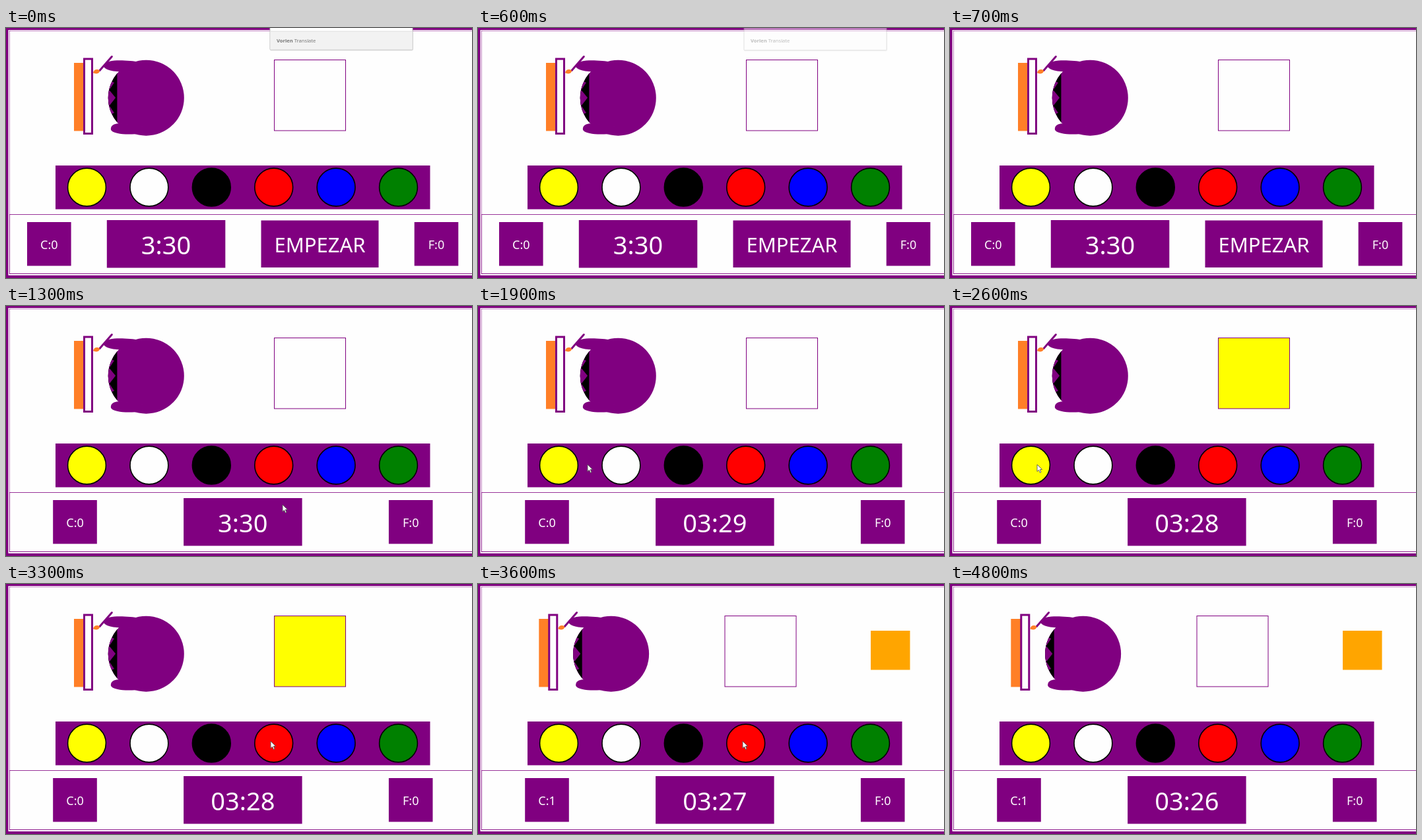
These frames come from a looping animation (706x380 px, 5.7 s). An HTML page:

```html
<!DOCTYPE html>
<html lang="es">
<head>
<meta charset="utf-8">
<title>Mezcla de colores</title>
<style>
html, body { margin: 0; width: 100%; height: 100%; overflow: hidden; background: #fefefe; }
svg { display: block; width: 706px; height: 380px; }
text { font-family: "Noto Sans", sans-serif; fill: #fff; text-anchor: middle; }
.big { font-size: 38px; }
.word { font-size: 31px; }
.small { font-size: 18px; }
.tip { font-size: 7.6px; fill: #777; text-anchor: start; }
.p { fill: #800080; }
</style>
</head>
<body>
<svg viewBox="0 0 706 380">
  <defs>
    <clipPath id="face"><rect x="150" y="45" width="18.4" height="122"/></clipPath>
    <clipPath id="head"><circle cx="212.3" cy="106.2" r="57.5"/></clipPath>
  </defs>
  <rect width="706" height="380" fill="#fefefe"/>
  <g class="p">
    <rect width="706" height="3"/>
    <rect width="3.5" height="380"/>
    <rect y="376" width="706" height="4"/>
    <rect x="5" y="4" width="701" height="1" opacity=".45"/>
    <rect x="5" y="4" width="1" height="279" opacity=".45"/>
    <rect x="5" y="283" width="701" height="1" opacity=".8"/>
    <rect x="5" y="283" width="1" height="91" opacity=".8"/>
    <rect x="5" y="373" width="701" height="1" opacity=".9"/>
  </g>

  <g id="painter">
    <rect x="103" y="53" width="15" height="103.5" fill="#ff7f27"/>
    <rect x="118.5" y="47" width="12" height="113.5" fill="#fefefe" stroke="#800080" stroke-width="3"/>
    <path d="M160.3 43.5 142 64.5" stroke="#800080" stroke-width="3" stroke-linecap="round"/>
    <path d="M132 68C133 63 138 61.5 142 64.5C142 69 137 71 132 68Z" fill="#ff7f27"/>
    <circle class="p" cx="212.3" cy="106.2" r="57.5"/>
    <circle cx="212.3" cy="106.2" r="57.5" clip-path="url(#face)"/>
    <g class="p" clip-path="url(#head)">
      <path d="M152 93 157.5 95.5 166 106 157.5 117 152 119Z"/>
      <path id="notch" d="M152 78 164 83 156.5 94 152 94Z"/>
      <path d="M152 134 164 129 156.5 118 152 118Z"/>
    </g>
    <path class="p" d="M148 56C151 50 166 48.5 180 49.5C192 50 200 51 206 53L202 65C186 67.5 168 67 158 64.5C151 62.5 147 60 148 56Z"/>
    <path class="p" d="M159 152C160 146 168 144 178 146L208 150L206 160C193 162 178 162 169 160C161 158 158 156 159 152Z"/>
  </g>

  <rect id="box" y="48.5" width="108" height="107.5" stroke="#800080"/>
  <rect id="mix" x="595" y="71" width="59.5" height="59.5" fill="#ffa500"/>

  <rect class="p" x="75" y="209" width="567.5" height="66.5"/>
  <g id="paints" stroke="#000" stroke-width="1.6"></g>

  <g id="hits"><rect class="p" x="-33.3" y="295" width="66.6" height="66.5"/><text class="small" y="335.5"></text></g>
  <g id="clock"><rect class="p" x="-89.7" y="292" width="179.5" height="72.5"/><text class="big" y="343.5"></text></g>
  <g id="start"><rect class="p" x="386.5" y="292.5" width="178" height="71.5"/><text class="word" x="475.5" y="341">EMPEZAR</text></g>
  <g id="fails"><rect class="p" x="-33.3" y="295" width="66.6" height="66.5"/><text class="small" y="335.5">F:0</text></g>

  <g id="popup">
    <rect x="399.5" y="-4" width="217.5" height="38.5" rx="2" fill="#000" opacity=".12"/>
    <rect x="400" y="-4" width="216" height="37" rx="1.5" fill="#fff" stroke="#c4c4c4"/>
    <rect id="strip" x="400.5" y="5" width="215" height="27.5" fill="#f2f2f2"/>
    <path id="rule" d="M400.5 5H615.5" stroke="#dedede"/>
    <text class="tip" x="410" y="21.5"><tspan font-weight="600">Vorlen</tspan> Translate</text>
  </g>

  <path id="arrow" d="M0 0V10.5L2.5 8.3 4.3 12.4 6 11.6 4.3 7.6H7.6Z" fill="#fff" stroke="#555" stroke-width=".9" stroke-linejoin="round"/>
</svg>
<script>
const LOOP = 5700, STEP = 100;
const $ = id => document.getElementById(id);
const clamp = v => Math.min(1, Math.max(0, v));
const show = (id, on) => $(id).setAttribute("display", on ? "inline" : "none");
const move = (id, x, y = 0) => $(id).setAttribute("transform", `translate(${x} ${y})`);
const write = (id, s) => { $(id).querySelector("text").textContent = s; };

["#ffff00", "#fefefe", "#000", "#f00", "#00f", "#008000"].forEach((fill, i) => {
  const c = document.createElementNS("http://www.w3.org/2000/svg", "circle");
  const attrs = { cx: 122.5 + 94.4 * i, cy: 242, r: 28.9, fill };
  for (const k in attrs) c.setAttribute(k, attrs[k]);
  $("paints").append(c);
});

// pointer path: time, x, y
const path = [
  [800, 447, 322], [1000, 444, 320], [1300, 419, 302], [1500, 310, 255],
  [1600, 262, 240], [1900, 166, 241], [2100, 143, 242], [2300, 132, 241],
  [2600, 132, 241], [2800, 232, 245], [3000, 355, 242], [3100, 387, 239],
  [3300, 401, 239], [4400, 401, 239], [4500, 412, 190], [4600, 440, 100], [4700, 470, 8]
];

function pointer(t) {
  let i = 0;
  while (i < path.length - 2 && t >= path[i + 1][0]) i++;
  const [a, b] = [path[i], path[i + 1]];
  const k = clamp((t - a[0]) / (b[0] - a[0]));
  return [a[1] + (b[1] - a[1]) * k, a[2] + (b[2] - a[2]) * k];
}

function draw(ms) {
  const t = Math.floor(ms % LOOP / STEP) * STEP;
  const playing = t >= 800, mixed = t >= 3500;

  move("painter", mixed ? -10.7 : 0);
  $("box").setAttribute("x", mixed ? 374 : 406.5);
  $("box").setAttribute("fill", t >= 2600 && !mixed ? "#ffff00" : "#fefefe");
  show("mix", mixed);

  move("hits", playing ? 104.5 : 65.3);
  move("clock", playing ? 358.8 : 242.5);
  move("fails", playing ? 613.2 : 652);
  show("start", !playing);
  write("hits", mixed ? "C:1" : "C:0");
  const left = 30 - Math.floor((t - 600) / 1000);
  write("clock", t < 1600 ? "3:30" : "03:" + Math.max(26, left));

  const fade = clamp((t - 300) / 400);
  show("popup", t < 700);
  move("popup", 4 * fade, fade);
  $("popup").setAttribute("opacity", 1 - 0.7 * fade);
  $("strip").setAttribute("opacity", 1 - fade);
  $("rule").setAttribute("opacity", 1 - fade);

  show("arrow", playing && t < 4800);
  move("arrow", ...pointer(t));
}

const begin = performance.now();
function tick() {
  draw(performance.now() - begin);
  requestAnimationFrame(tick);
}
draw(0);
requestAnimationFrame(tick);
</script>
</body>
</html>
```
